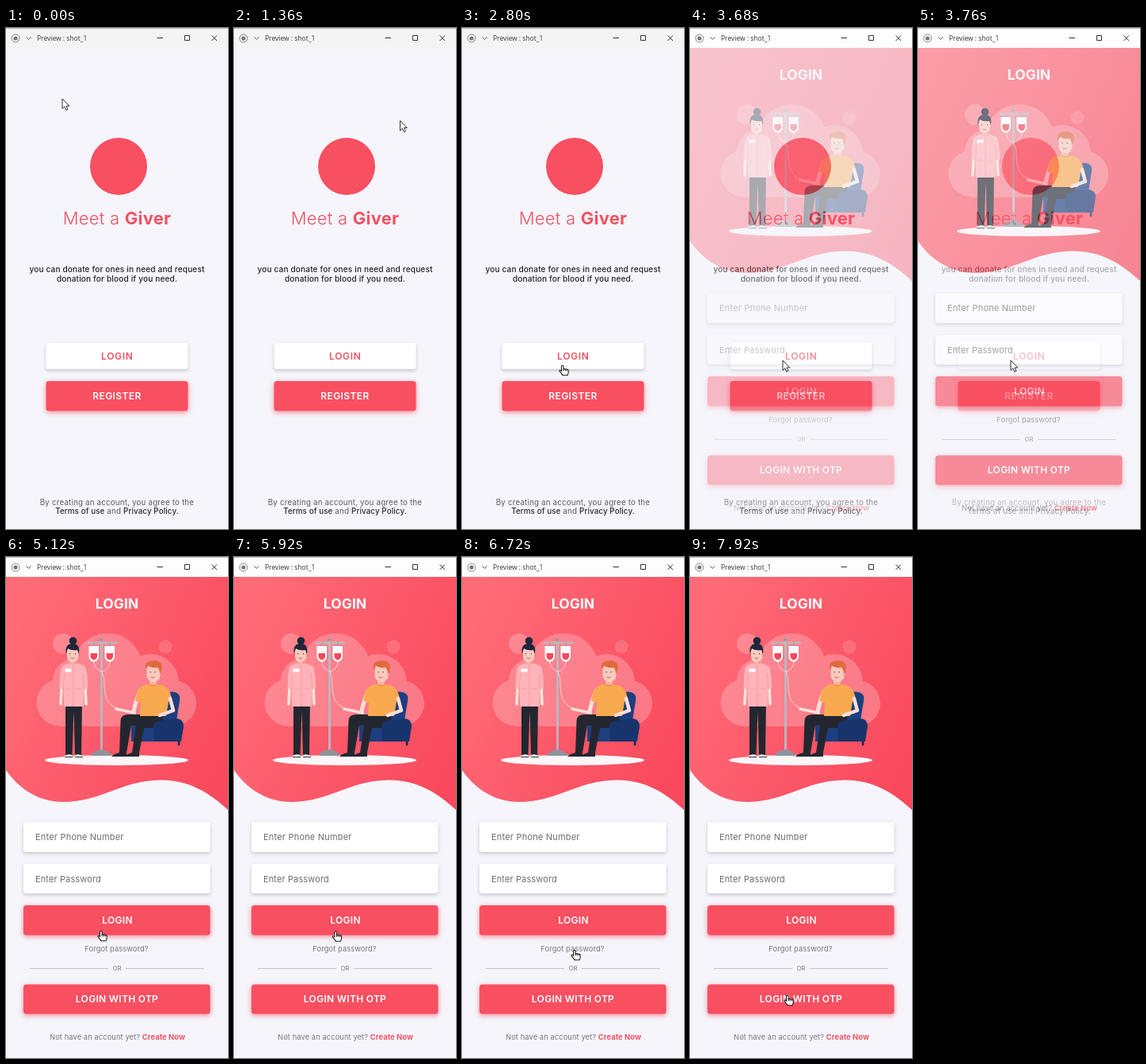
Animation, 280 px wide and 630 px high, one loop 8 s. Source, as an HTML page:

```html
<!DOCTYPE html>
<html lang="en">
<head>
<meta charset="utf-8">
<title>Preview</title>
<style>
html, body { margin: 0; width: 100%; height: 100%; overflow: hidden; background: #f5f5fb; }
svg { display: block; width: 280px; height: 630px; font-family: Inter, "Open Sans", sans-serif; }
.mid { text-anchor: middle; }
.red { fill: #f25263; }
.card { fill: #fff; filter: drop-shadow(0 2px 2px rgba(60, 60, 80, .26)); }
.btn { fill: #f84f61; filter: drop-shadow(0 2.5px 3px rgba(248, 79, 97, .65)); }
.cap { font-size: 12px; font-weight: 600; letter-spacing: .3px; }
.onred { fill: #fff; }
.hint { font-size: 11px; letter-spacing: .12px; fill: #6d6d72; }
.note { font-size: 9.35px; letter-spacing: .08px; fill: #77777c; }
.lead { font-size: 10.1px; font-weight: 450; letter-spacing: .14px; fill: #222226; }
.terms { font-size: 9.8px; letter-spacing: .17px; fill: #5c5c60; }
.terms tspan { font-weight: 500; letter-spacing: .1px; fill: #2a2a2e; }
</style>
</head>
<body>
<svg viewBox="0 0 280 630">
  <defs>
    <linearGradient id="warm" x1="0" y1=".25" x2="1" y2=".75">
      <stop offset="0" stop-color="#ff6b77"/>
      <stop offset="1" stop-color="#f9495d"/>
    </linearGradient>
    <pattern id="stripes" width="2.4" height="2.4" patternUnits="userSpaceOnUse" patternTransform="rotate(45)">
      <path d="M0 .6H2.4" stroke="#ff98a0" stroke-width=".9"/>
    </pattern>
  </defs>

  <g id="welcome">
    <rect width="280" height="630" fill="#f5f5fb"/>
    <circle cx="142" cy="174" r="36" fill="#f84f61"/>
    <text class="mid red" x="140" y="247" font-size="22" font-weight="300" letter-spacing=".25">Meet a <tspan font-weight="700">Giver</tspan></text>
    <text class="mid lead" x="140" y="307">you can donate for ones in need and request</text>
    <text class="mid lead" x="140" y="319">donation for blood if you need.</text>
    <rect class="card" x="50.5" y="396" width="179" height="33" rx="3"/>
    <text class="mid cap red" x="140.3" y="417" style="letter-spacing:.7px">LOGIN</text>
    <rect class="btn" x="50.5" y="444" width="179" height="37.5" rx="3.5"/>
    <text class="mid cap onred" x="140" y="467" style="letter-spacing:.4px">REGISTER</text>
    <text class="mid terms" x="140" y="599.5">By creating an account, you agree to the</text>
    <text class="mid terms" x="140" y="610.5"><tspan>Terms of use</tspan> and <tspan>Privacy Policy.</tspan></text>
  </g>

  <g id="login">
    <rect width="280" height="630" fill="#f5f5fb"/>
    <path fill="url(#warm)" d="M0 24H280V318C255 295 230 280.5 195 280.5C145 281 120 308 72 308C40 308 15 290 0 268Z"/>
    <text class="mid onred" x="140" y="65" font-size="17.5" font-weight="700">LOGIN</text>

    <g fill="#fff" opacity=".23">
      <circle cx="72" cy="109" r="13"/>
      <circle cx="68" cy="183" r="29.5"/>
      <circle cx="86" cy="155" r="27"/>
      <circle cx="128" cy="140" r="44"/>
      <circle cx="182" cy="158" r="36"/>
      <circle cx="211" cy="184" r="29"/>
      <rect x="68" y="160" width="143" height="53"/>
    </g>
    <circle cx="201" cy="113" r="8.5" fill="url(#stripes)"/>
    <ellipse cx="139.5" cy="255.5" rx="90.5" ry="6.5" fill="#fdf6f8"/>

    <g id="nurse">
      <path d="M75 184H96L95 249H87L85.5 194L83.5 249H75Z" fill="#24262f"/>
      <path d="M74 250q4-3 9.5-1v3H73ZM87 249q5-2 9 1l1 2H87Z" fill="#fff"/>
      <path d="M74 251.5H84M87 251.5H97" stroke="#24262f"/>
      <path d="M70 163L69 185M100 163L101 185" stroke="#fde3dc" stroke-width="3.6" stroke-linecap="round"/>
      <rect x="81" y="128" width="6" height="9" fill="#f3b3a5"/>
      <path d="M79 133L71 137Q68 141 67.5 166H72.5L73 188H98L98.5 166H103Q103 142 99 137L89 133L84.5 138Z" fill="#ffb4ba"/>
      <path d="M73.5 146L72.5 166M97.5 146L98.5 166M85 138V188" fill="none" stroke="#f6929d" stroke-width=".8"/>
      <rect x="74.5" y="140.5" width="8" height="4" rx=".8" fill="#fff"/>
      <path d="M76 166H82M89 166H95" stroke="#f6929d" stroke-width=".8"/>
      <circle cx="84.5" cy="105.5" r="4.8" fill="#20263a"/>
      <rect x="77" y="111" width="14" height="21" rx="6" fill="#fbcabd"/>
      <path d="M75.5 122Q74 109 84 109Q94 109 92 122L90 117Q82 118 78 115Z" fill="#20263a"/>
      <path d="M80.5 121v1.2M87.5 121v1.2" stroke="#20263a"/>
      <path d="M82 127q2 1.6 4 0" fill="none" stroke="#d6495b" stroke-width=".9"/>
    </g>

    <g id="drip">
      <path d="M120.5 102V247" stroke="#b7bac1" stroke-width="2.8"/>
      <path d="M104 108H139" stroke="#b7bac1" stroke-width="2.4" stroke-linecap="round"/>
      <circle cx="120.5" cy="104" r="1.8" fill="#8f939d"/>
      <path d="M107 250Q109 243 120 242Q131 243 133 250Z" fill="#8f939d"/>
      <g id="bag">
        <path d="M111 108V112" stroke="#8f939d"/>
        <path d="M104.5 112H117V126Q116 131 110.7 132Q105.5 131 104.5 126Z" fill="#fff"/>
        <path d="M106.5 121H115V125.5Q114 129 110.7 129.5Q107.5 129 106.5 125.5Z" fill="#f04a5c"/>
      </g>
      <use href="#bag" x="20"/>
      <path d="M111 132Q112 142 121 144Q125 152 124 162Q124 184 139 190M131 132Q130 142 121 144" fill="none" stroke="#ffd5d8" stroke-width=".9"/>
    </g>

    <g id="seated">
      <path d="M163 231V237M218 231V237" stroke="#15254c" stroke-width="2.6"/>
      <path d="M187 206L198 176Q202 168 213 170Q221 172 219 181L214 212H187Z" fill="#1d3f80"/>
      <path d="M158 213Q158 207 165 207H207V232H158Z" fill="#1d3f80"/>
      <path d="M162 196L139 191" stroke="#fde0d8" stroke-width="3.8" stroke-linecap="round"/>
      <path d="M169 168Q163 184 161 194" fill="none" stroke="#fde0d8" stroke-width="5" stroke-linecap="round"/>
      <path d="M198 198H154Q145 198 144.5 206L143 246H152L158 212H164L159 246H168L174 215H199Z" fill="#24262f"/>
      <path d="M143 246H152V251H133Q135 248 143 246ZM159 246H168V251H149Q152 248 159 246Z" fill="#24262f"/>
      <path d="M133 252H152M154 252H168" stroke="#fff"/>
      <path d="M181 149h9v13h-9z" fill="#f3b3a5"/>
      <path d="M180 160Q170 161 166 168L163 181L170 183L169 200H202L205 182L209 179Q207 164 196 161Z" fill="#f9a950"/>
      <path d="M180 160q5 4 11 0" fill="none" stroke="#e98c36"/>
      <rect x="177.5" y="132" width="17" height="25" rx="7.5" fill="#fbcabd"/>
      <path d="M176.5 142Q174 133 181 131Q195 128 197 137Q197 143 194.5 147L192 139Q184 140 179 137Z" fill="#e06b3e"/>
      <path d="M182 144v1.3M188 144v1.3" stroke="#24262f"/>
      <path d="M182.5 151q2.5 1.8 5 0" fill="none" stroke="#c9574c" stroke-width=".9"/>
      <path d="M207 178L211 193L194 199" fill="none" stroke="#fde0d8" stroke-width="4.5" stroke-linecap="round" stroke-linejoin="round"/>
      <path d="M186 214Q186 206 195 206L214 203Q224 203 224 213L221 232H187Z" fill="#18346c"/>
    </g>

    <rect class="card" x="22" y="333.5" width="235.5" height="37.5" rx="3"/>
    <text class="hint" x="37" y="356" style="letter-spacing:.2px">Enter Phone Number</text>
    <rect class="card" x="22" y="386" width="235.5" height="37" rx="3"/>
    <text class="hint" x="37" y="408.5">Enter Password</text>
    <rect class="btn" x="22" y="438" width="235.5" height="37.5" rx="3.5"/>
    <text class="mid cap onred" x="140.5" y="461">LOGIN</text>
    <text class="mid note" x="139.5" y="495.5">Forgot password?</text>
    <path d="M30 517.5H129M151 517.5H250" stroke="#bcbcc2" stroke-width=".9"/>
    <text class="mid" x="140" y="520" font-size="7.8" fill="#77777c">OR</text>
    <rect class="btn" x="22" y="537.5" width="235.5" height="37" rx="3.5"/>
    <text class="mid cap onred" x="140" y="560">LOGIN WITH OTP</text>
    <text class="mid note" x="140.5" y="607">Not have an account yet? <tspan class="red" font-weight="700">Create Now</tspan></text>
  </g>

  <g id="titlebar" fill="none" stroke="#333">
    <rect id="bar" width="280" height="25" stroke="none"/>
    <path d="M0 .3H280" stroke="#8a8a8a" stroke-width=".7"/>
    <circle cx="12" cy="13" r="5" stroke="#888"/>
    <circle cx="12" cy="13" r="2.6" fill="#777" stroke="none"/>
    <path d="M25.5 11.5L28.5 14.3L31.5 11.5" stroke="#555"/>
    <text x="39" y="16" fill="#333" stroke="none" font-size="8.5" font-family="'Open Sans', sans-serif">Preview : shot_1</text>
    <path d="M190.5 12.5H198M225.5 9.5H231.5V15.5H225.5ZM259.5 9.5L266 16M266 9.5L259.5 16"/>
  </g>

  <g id="cursor" fill="#fff" stroke="#1a1a1a" stroke-linejoin="round">
    <path id="arrow" stroke-width=".9" d="M0 0V12.5L2.9 9.8L4.9 14.3L6.9 13.4L5 9.1H8.8Z"/>
    <path id="hand" stroke-width="1.15" transform="translate(.3 .4) scale(.92)" d="M-1.4 1.2a1.4 1.4 0 0 1 2.8 0V5q1.2-.9 2.4.1q1.2-.7 2.2.3q1.6-.4 2 1.2V9.5q0 2-1.2 3.2V13.5H0V12.8L-3.9 8.2q-.8-1.3.4-1.8q1-.2 2.1 1.4ZM1.4 5V7.5M3.8 5.2V7.5M6 5.5V7.5"/>
  </g>
</svg>
<script>
const LOOP = 8000, STEP = 80, FADE_AT = 3600, FADE = 400;
const el = id => document.getElementById(id);
const welcome = el("welcome"), login = el("login"), bar = el("bar");
const cursor = el("cursor"), arrow = el("arrow"), hand = el("hand");

// Pointer stops: time, x, y
const stops = [
  [0, 71, 89], [920, 71, 89], [1120, 128, 48], [1360, 209.5, 116.5],
  [1520, 228, 185], [1760, 160, 330], [2000, 62, 465], [2240, 28, 450],
  [2520, 90, 432], [2800, 126.5, 424], [3200, 122, 421], [3520, 117, 418],
  [4400, 117, 418], [4760, 121, 458], [5120, 119.5, 470], [5840, 126, 468],
  [6320, 139, 490], [6720, 141.5, 494], [7280, 140, 496], [7680, 126, 545],
  [7920, 122.5, 551], [8000, 122.5, 551]
];

// Clickable areas: left, top, right, bottom
const welcomeLinks = [[50, 396, 229, 429], [50, 444, 229, 481]];
const loginLinks = [[22, 438, 258, 476], [99, 486, 180, 502], [22, 537, 258, 575], [171, 598, 226, 611]];

function pointerAt(t) {
  let i = 0;
  while (i < stops.length - 2 && t >= stops[i + 1][0]) i++;
  const a = stops[i], b = stops[i + 1];
  const before = stops[i - 1] || a, after = stops[i + 2] || b;
  const u = (t - a[0]) / (b[0] - a[0]);
  return [1, 2].map(k => {
    if (a[1] === b[1] && a[2] === b[2]) return a[k];
    const m = (b[k] - before[k]) / 2, n = (after[k] - a[k]) / 2, d = b[k] - a[k];
    return a[k] + u * (m + u * (3 * d - 2 * m - n + u * (m + n - 2 * d)));
  });
}

function draw(t) {
  const p = Math.min(1, Math.max(0, (t - FADE_AT) / FADE));
  login.setAttribute("opacity", 1 - (1 - p) ** 2);
  login.style.display = p > 0 ? "" : "none";
  welcome.style.display = p < 1 ? "" : "none";
  // The click gives the window focus
  bar.setAttribute("fill", t < FADE_AT ? "#f4f4f4" : "#fdfdfd");

  const [x, y] = pointerAt(t);
  const links = t < FADE_AT ? welcomeLinks : loginLinks;
  const over = links.some(([l, top, r, b]) => x >= l && x <= r && y >= top && y <= b);
  cursor.setAttribute("transform", `translate(${x} ${y})`);
  arrow.style.display = over ? "none" : "";
  hand.style.display = over ? "" : "none";
}

const start = performance.now();
function tick() {
  const t = (performance.now() - start) % LOOP;
  draw(Math.floor(t / STEP) * STEP);
  requestAnimationFrame(tick);
}
draw(0);
requestAnimationFrame(tick);
</script>
</body>
</html>
```
